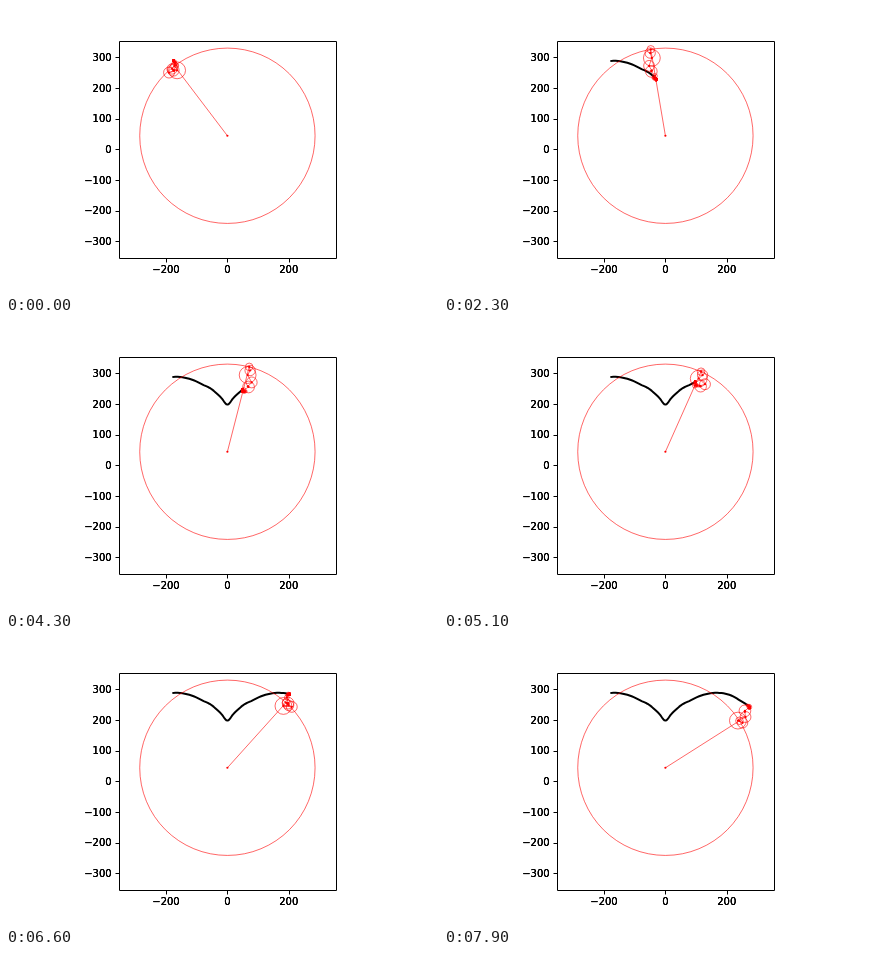
Write an HTML page with a canvas that moves like this. It is 432 by 288 pixels and loops after 8000 ms.

```html
<!DOCTYPE html>
<html lang="en">
<head>
<meta charset="utf-8">
<title>Epicycles drawing a heart</title>
<style>
html, body { margin: 0; width: 432px; height: 288px; overflow: hidden; background: #fff; }
canvas { display: block; }
</style>
</head>
<body>
<canvas id="stage" width="432" height="288"></canvas>
<script>
const ctx = document.getElementById('stage').getContext('2d');
const TAU = 2 * Math.PI;
const CX = 221.4, CY = 130;          // pivot of the first arm
const ZERO_Y = 143.28, UNIT = 0.307; // axis origin and pixels per unit
const HALF = 150, STEP = 6;          // samples in half an outline, samples per point
const ORDER = 40, FRAMES = 80, CLEFT = 31;

// Right half of the heart from cleft to tip, relative to the pivot, y up.
const outline = [
  [0, 46.5], [6.5, 54.5], [15, 62.5], [25.5, 68], [38, 73.5], [52, 75.5],
  [64, 73.5], [75, 67.5], [84.5, 61], [90, 50.5], [93.5, 38], [95.5, 25.5],
  [95.5, 13], [94, 1], [90.5, -10], [85.5, -21], [79, -31.5], [72, -41.5],
  [64.5, -50.5], [56.5, -59], [48, -67.5], [39, -76], [30, -83.5],
  [20.5, -91], [10.5, -98], [0, -104]
];

function sample(k) {
  const i = Math.min(Math.floor(k / STEP), outline.length - 2);
  const f = k / STEP - i;
  return [0, 1].map(j => outline[i][j] * (1 - f) + outline[i + 1][j] * f);
}

// The outline is mirror symmetric, so every Fourier coefficient is real.
function coefficient(n) {
  let sum = 0;
  for (let k = 0; k <= HALF; k++) {
    const [x, y] = sample(k), a = n * k * Math.PI / HALF;
    sum += (x * Math.sin(a) + y * Math.cos(a)) * (k % HALF ? 1 : 0.5);
  }
  return sum / HALF;
}

const base = coefficient(0);
const arms = [];
for (let n = 1; n <= ORDER; n++) {
  for (const m of [n, -n]) arms.push({ n: m, r: coefficient(m) });
}

function chain(frame) {
  const angle = (frame - CLEFT) * Math.PI / HALF;
  let x = CX, y = CY - base;
  const joints = [[x, y]];
  for (const { n, r } of arms) {
    x += r * Math.sin(n * angle);
    y -= r * Math.cos(n * angle);
    joints.push([x, y]);
  }
  return joints;
}

const chains = Array.from({ length: FRAMES }, (_, i) => chain(i));
const trail = chains.map(joints => joints[joints.length - 1]);

function polyline(points, color, width) {
  ctx.beginPath();
  points.forEach(([x, y]) => ctx.lineTo(x, y));
  ctx.strokeStyle = color;
  ctx.lineWidth = width;
  ctx.stroke();
}

function label(value, x, y, align) {
  ctx.textAlign = align;
  // Repeated passes give the heavy edges of the axis labels.
  for (let i = 0; i < 3; i++) ctx.fillText(String(value).replace('-', '\u2212'), x, y);
}

function drawAxes() {
  const snap = v => Math.round(v) + 0.5;
  ctx.strokeStyle = ctx.fillStyle = '#000';
  ctx.lineWidth = 1;
  ctx.strokeRect(113.5, 35.5, 217, 217);
  ctx.font = '10px "DejaVu Sans", sans-serif';
  for (let v = -300; v <= 300; v += 100) {
    const y = ZERO_Y - v * UNIT;
    polyline([[109.5, snap(y)], [113, snap(y)]], '#000', 1);
    label(v, 105.7, Math.round(y + 3.7), 'right');
  }
  for (const v of [-200, 0, 200]) {
    const x = CX + v * UNIT;
    polyline([[snap(x), 253], [snap(x), 256.5]], '#000', 1);
    label(v, x, 267, 'center');
  }
}

function draw(frame) {
  const joints = chains[frame];
  ctx.fillStyle = '#fff';
  ctx.fillRect(0, 0, 432, 288);
  drawAxes();
  ctx.lineJoin = 'round';
  ctx.lineCap = 'square';
  polyline(trail.slice(0, frame + 1), '#000', 2);
  ctx.lineCap = 'butt';

  ctx.strokeStyle = ctx.fillStyle = '#f00';
  ctx.lineWidth = 0.6;
  arms.forEach(({ r }, i) => {
    ctx.beginPath();
    ctx.arc(...joints[i], Math.abs(r), 0, TAU);
    ctx.stroke();
  });
  polyline(joints, '#f00', 0.6);
  for (const [x, y] of joints) {
    ctx.beginPath();
    ctx.arc(x, y, 1.1, 0, TAU);
    ctx.fill();
  }
}

const start = performance.now();
function tick() {
  draw(Math.floor((performance.now() - start) / 100) % FRAMES);
  requestAnimationFrame(tick);
}
tick();
</script>
</body>
</html>
```
